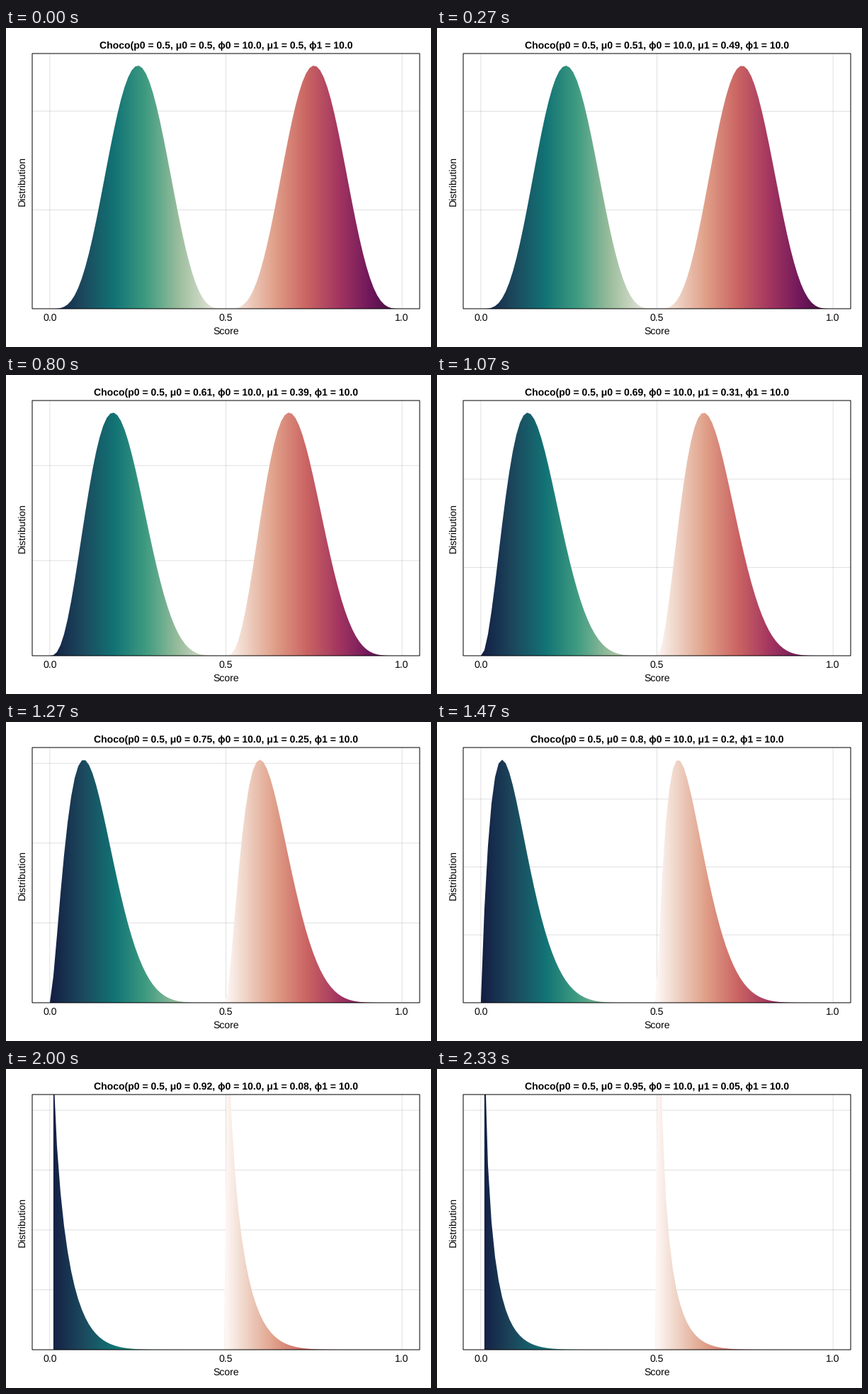
These frames come from a looping animation (600 by 450 pixels, 8000 ms). A matplotlib script:

```python
import math

import matplotlib.pyplot as plt
import numpy as np
from matplotlib.animation import FuncAnimation
from matplotlib.collections import LineCollection
from matplotlib.colors import LinearSegmentedColormap
from matplotlib.patches import Rectangle
from matplotlib.path import Path

W, H, DPI = 600, 450, 100
PX = 72 / DPI  # one pixel in points
LEFT, RIGHT, TOP, BOTTOM = 37, 584, 36, 396
FRAMES, LOOP_MS = 120, 8000
PHI = 10.0
EASE_LEN = 35.85  # length of the sweep, in frames
LAST_MOVE = 35
LAST_FINITE = 28  # beyond this the density at 0 is infinite and the y axis freezes

plt.rcParams["font.family"] = ["Liberation Sans", "DejaVu Sans"]
plt.rcParams["text.hinting"] = "none"

STOPS = [
    (20, 29, 67), (28, 72, 93), (18, 115, 117), (63, 156, 129),
    (153, 189, 156), (223, 225, 211), (254, 246, 244), (241, 218, 206),
    (224, 160, 137), (203, 101, 99), (164, 54, 96), (111, 23, 91), (51, 13, 53),
]
SPOTS = [i / 11 for i in range(6)] + [0.5] + [i / 11 for i in range(6, 12)]
CURL = LinearSegmentedColormap.from_list(
    "curl", [(p, [v / 255 for v in c]) for p, c in zip(SPOTS, STOPS)], N=1024)

XS = np.linspace(0, 1, 100)


def px(x):
    return LEFT + (x + 0.05) / 1.1 * (RIGHT - LEFT)


def py(y, top):
    return BOTTOM - y / top * (BOTTOM - TOP)


def mu_at(k):
    t = min(k, LAST_MOVE) / EASE_LEN
    return 0.5 + 0.45 * (1 - math.cos(math.pi * t)) / 2


def beta_pdf(u, a, b):
    log_norm = math.lgamma(a + b) - math.lgamma(a) - math.lgamma(b)
    return math.exp(log_norm) * u ** (a - 1) * (1 - u) ** (b - 1)


def density(mu):
    """Two mirrored beta halves joined at 0.5; infinite points become NaN."""
    a, b = (1 - mu) * PHI, mu * PHI
    u = np.where(XS < 0.5, 2 * XS, 2 * XS - 1)
    with np.errstate(divide="ignore"):
        ys = beta_pdf(u, a, b)
    return np.where(np.isfinite(ys), ys, np.nan)


fig = plt.figure(figsize=(W / DPI, H / DPI), dpi=DPI, facecolor="white")
ax = fig.add_axes([0, 0, 1, 1])
ax.axis("off")

GRID = dict(colors=[(0, 0, 0, 0.12)], linewidths=PX, zorder=1)
x_grid = LineCollection(
    [[(px(x), TOP), (px(x), BOTTOM)] for x in (0, 0.5, 1)], **GRID)
y_grid = LineCollection([], **GRID)
for grid in (x_grid, y_grid):
    grid.set_snap(False)
    ax.add_collection(grid, autolim=False)

fill = ax.imshow(CURL(np.linspace(0, 1, 995))[None, :, :3],
                 extent=(px(0), px(1), BOTTOM, TOP), aspect="auto",
                 interpolation="bilinear", zorder=2)
ax.add_patch(Rectangle((LEFT, TOP), RIGHT - LEFT, BOTTOM - TOP, fill=False,
                       ec="black", lw=PX, snap=False, zorder=3))
ax.set_xlim(0, W)
ax.set_ylim(H, 0)


def label(x, y, text, **kw):
    return ax.text(x, y, text, fontsize=14 * PX, color="black",
                   ha="center", va=kw.pop("va", "baseline"), **kw)


MID = (LEFT + RIGHT) / 2
title = label(MID, 29, "", weight="bold")
label(MID, 431.7, "Score")
label(23, (TOP + BOTTOM) / 2, "Distribution", rotation=90, va="center")
for x in (0.0, 0.5, 1.0):
    label(px(x), 412.7, str(x))


def update(k):
    mu = mu_at(k)
    ys = density(mu)
    top = 1.05 * np.nanmax(density(mu_at(min(k, LAST_FINITE))))

    ok = ~np.isnan(ys)
    x, y = px(XS[ok]), py(ys[ok], top)
    outline = np.vstack([[(x[0], BOTTOM)], np.column_stack([x, y]),
                         [(x[-1], BOTTOM)], [(x[0], BOTTOM)]])
    fill.set_clip_path(Path(outline, closed=True), transform=ax.transData)

    step = 1 if top < 7.5 else 2
    y_grid.set_segments([[(LEFT, py(v, top)), (RIGHT, py(v, top))]
                         for v in np.arange(step, top, step)])

    title.set_text(f"Choco(p0 = 0.5, μ0 = {round(mu, 2)}, ϕ0 = {PHI}, "
                   f"μ1 = {round(1 - mu, 2)}, ϕ1 = {PHI}")
    return fill, y_grid, title


anim = FuncAnimation(fig, update, frames=FRAMES, interval=LOOP_MS / FRAMES,
                     repeat=True, repeat_delay=0, blit=False)
plt.show()
```
